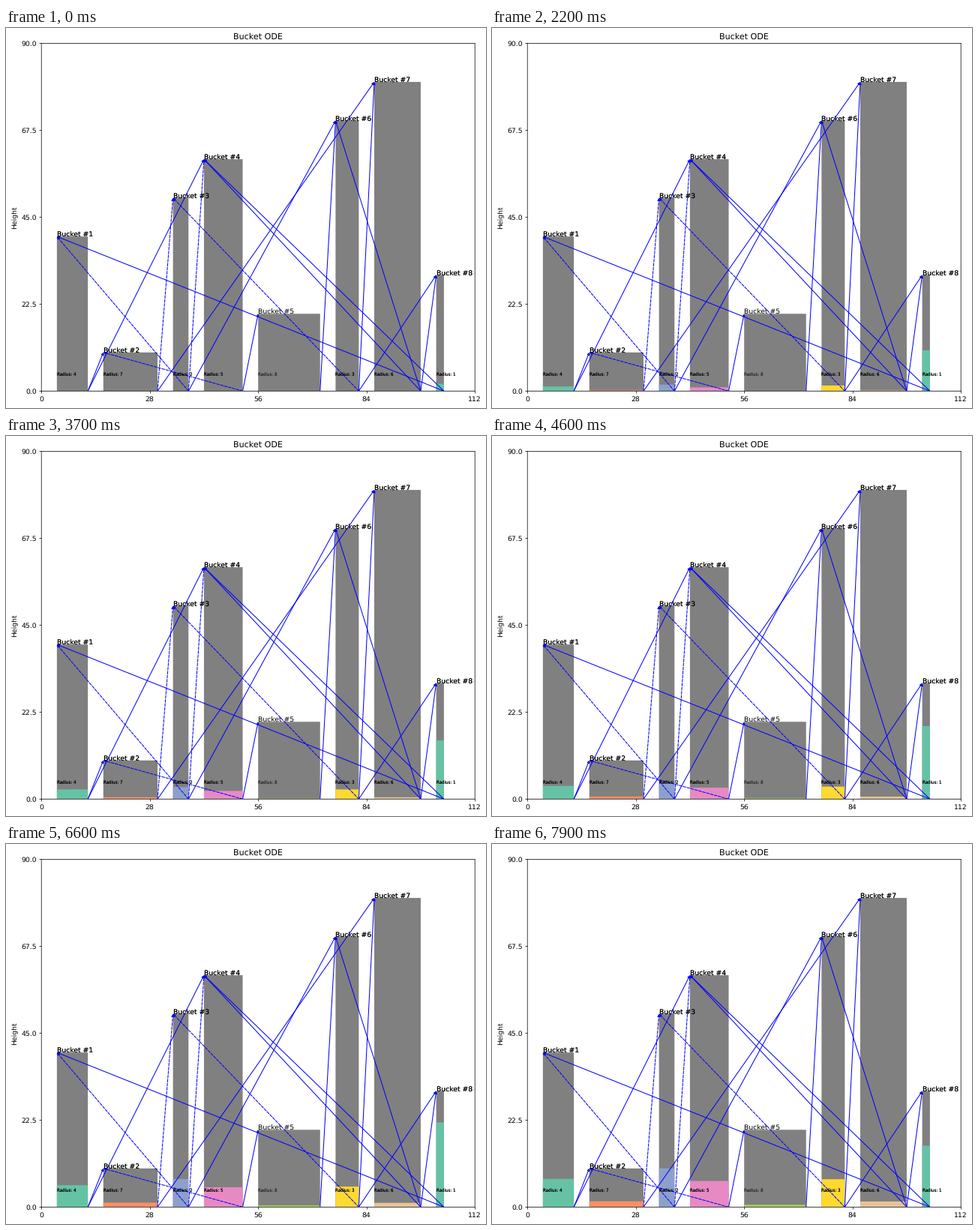
These frames come from a looping animation (640x507 px, 8 s). A matplotlib script:

```python
import matplotlib.pyplot as plt
import numpy as np
from matplotlib.animation import FuncAnimation
from matplotlib.patches import FancyArrowPatch

DPI = 64
S = 25 / 24  # point sizes below are meant for 66.67 dpi
FRAMES, STEP = 80, 100
END = 7.9

plt.rcParams.update({
    "font.family": "DejaVu Sans",
    "font.size": 10 * S,
    "text.hinting": "none",
    "axes.linewidth": 0.8 * S,
    "axes.titlepad": 6 * S,
    "axes.labelpad": 4 * S,
})
for axis in ("xtick", "ytick"):
    plt.rcParams.update({
        f"{axis}.major.size": 3.5 * S,
        f"{axis}.major.pad": 3.5 * S,
        f"{axis}.major.width": 0.8 * S,
    })

RADII = [4, 7, 2, 5, 8, 3, 6, 1]
HEIGHTS = [40, 10, 50, 60, 20, 70, 80, 30]
GAP = 4
COLORS = plt.get_cmap("Set2").colors[:7]

PIPES = {1: [2, 4], 2: [3, 7], 3: [1, 4, 6], 4: [2, 5],
         5: [6], 6: [3, 7, 8], 7: [4, 6, 8], 8: [1, 4]}
DASHED = {(2, 3), (3, 1), (3, 4), (4, 2), (6, 3)}

# Steady inflow, final level and growth power of the slow buckets
GROWTH = [(0, 7.3, 1.41), (0, 1.5, 1.5), (0.72, 10, 3), (0, 6.75, 1.53),
          (0, 0.57, 1.75), (0.65, 7.2, 4), (0, 1.45, 1.55)]
DUMPS = [5.45, 6.85, 7.85, 8.85]


def slow_level(t, rate, final, power):
    return rate * t + (final - rate * END) * (t / END) ** power


def fast_level(t):
    """Fill ever faster, then cycle between dumping and refilling."""
    if t < DUMPS[0]:
        return 5.7 + 2 * t + 0.041 * t ** 3 - 3.8 * np.exp(-t / 0.2)
    return 15.5 + 7.8 * (np.interp(t, DUMPS, range(len(DUMPS))) % 1)


def levels(t):
    return [slow_level(t, *g) for g in GROWTH] + [fast_level(t)]


fig = plt.figure(figsize=(640 / DPI, 507 / DPI), dpi=DPI)
ax = fig.add_axes([47.2 / 640, 22.6 / 507, 578 / 640, 464 / 507])
ax.set_xlim(0, 112)
ax.set_ylim(0, 90)
ax.set_xticks(np.linspace(0, 112, 5))
ax.set_yticks(np.linspace(0, 90, 5))
ax.set_title("Bucket ODE", fontsize=12 * S)
ax.set_ylabel("Height")
for spine in ax.spines.values():
    spine.set_snap(False)

widths = 2 * np.array(RADII)
rights = np.cumsum(widths + GAP)
lefts = rights - widths
ax.bar(lefts, HEIGHTS, widths, align="edge", color="gray", snap=False)
water = ax.bar(lefts, levels(0), widths, align="edge", snap=False,
               color=[COLORS[i % len(COLORS)] for i in range(8)])


def label(x, y, text, pipes, size=10):
    # A second pass darkens buckets with several pipes
    for _ in range(min(pipes, 2)):
        ax.text(x, y, text, fontsize=size * S)


for src, targets in PIPES.items():
    a = src - 1
    label(lefts[a], 4, f"Radius: {RADII[a]}", len(targets), 6)
    inflows = sum(src in dsts for dsts in PIPES.values())
    label(lefts[a], HEIGHTS[a], f"Bucket #{src}", inflows)
    for dst in targets:
        ax.add_patch(FancyArrowPatch(
            (rights[a], 0), (lefts[dst - 1], HEIGHTS[dst - 1]),
            arrowstyle="-|>", mutation_scale=7 * S, shrinkA=0, shrinkB=0,
            color="blue", lw=1.1 * S,
            ls="--" if (src, dst) in DASHED else "-"))


def update(i):
    for bar, h in zip(water, levels(i * STEP / 1000)):
        bar.set_height(h)
    return list(water)


anim = FuncAnimation(fig, update, frames=FRAMES, interval=STEP,
                     repeat=True, repeat_delay=0, blit=False)
plt.show()
```
